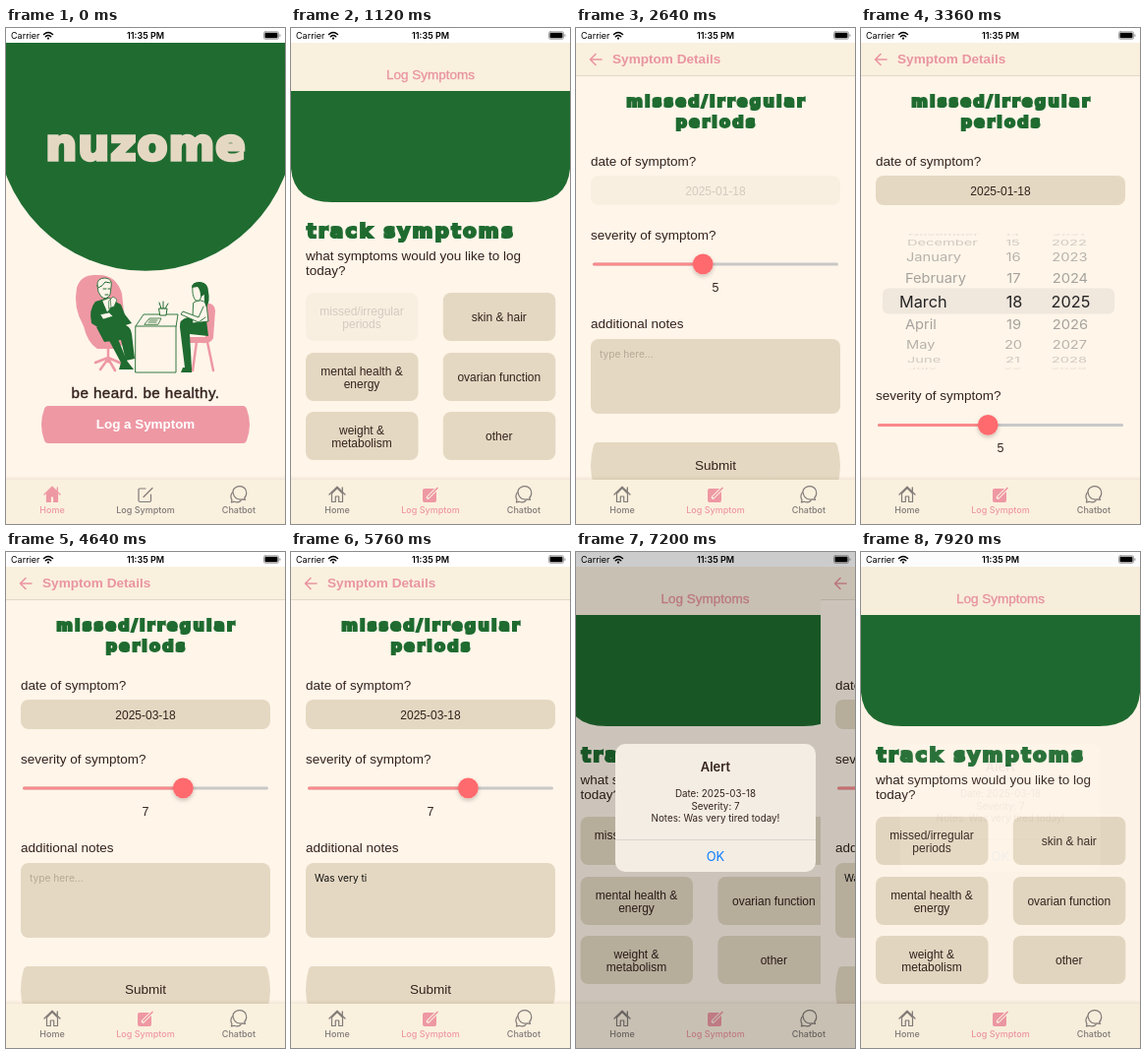
These frames come from a looping animation (284x504 px, 8000 ms). An HTML page:

```html
<!DOCTYPE html>
<html lang="en">
<head>
<meta charset="utf-8">
<title>Symptom tracker</title>
<style>
  html, body { margin: 0; width: 100%; height: 100%; overflow: hidden; background: #fff5e9; }
  svg { display: block; width: 100vw; height: 100vh; }
  text { font-family: "Liberation Sans", Arial, sans-serif; fill: #33221d; white-space: pre; }
  .mid { text-anchor: middle; }
  .ui { font-family: Inter, sans-serif; }
  .fat { font-family: "DejaVu Sans", sans-serif; font-weight: 700; fill: #1f6b30; stroke: #1f6b30; stroke-width: 2.2; }
  .bold { font-weight: 700; }
  .semi { font-weight: 600; }
  .tab { font-weight: 500; fill: inherit; }
  .pink { fill: #e995a1; }
</style>
</head>
<body>
<svg id="stage" viewBox="0 0 284 504"></svg>
<script>
const LOOP = 8000;
const PAGE = '#fff5e9', BAR = '#faf0de', GREEN = '#1f6b30', BEIGE = '#e5d8c2', PINK = '#ee98a4';
const MONTHS = ['January', 'February', 'March', 'April', 'May', 'June', 'July',
  'August', 'September', 'October', 'November', 'December'];
const NOTE = 'Was very tired today!';

// y is the vertical middle of the text
const text = (x, y, size, str, cls = '', more = '') =>
  `<text x="${x}" y="${y + size * .35}" font-size="${size}" class="${cls}" ${more}>${str}</text>`;
const box = (x, y, w, h, fill, rx = 0, ry = rx) =>
  `<rect x="${x}" y="${y}" width="${w}" height="${h}" rx="${rx}" ry="${ry}" fill="${fill}"/>`;
const path = (d, fill = 'none', stroke = 'none', width = 1) =>
  `<path d="${d}" fill="${fill}" stroke="${stroke}" stroke-width="${width}" stroke-linecap="round" stroke-linejoin="round"/>`;
const fat = (x, y, size, spacing, str, cls = '') =>
  `<text x="${x}" y="${y}" font-size="${size}" letter-spacing="${spacing}" class="fat ${cls}">${str}</text>`;
const group = (id, content) => `<g id="${id}">${content}</g>`;

function choice(x, y, lines) {
  const top = y + 25 - (lines.length - 1) * 6.5;
  return box(x, y, 114.5, 49, BEIGE, 8) +
    lines.map((line, i) => text(x + 57, top + i * 13, 12, line, 'mid')).join('');
}

// button with sides that bulge outwards
const pill = (x, y, w, h, fill) =>
  path(`M${x + 7} ${y}H${x + w - 7}Q${x + w - 4} ${y} ${x + w - 3} ${y + 3}Q${x + w + 3} ${y + h / 2} ${x + w - 3} ${y + h - 3}` +
    `Q${x + w - 4} ${y + h} ${x + w - 7} ${y + h}H${x + 7}Q${x + 4} ${y + h} ${x + 3} ${y + h - 3}Q${x - 3} ${y + h / 2} ${x + 3} ${y + 3}Q${x + 4} ${y} ${x + 7} ${y}Z`, fill);

const meeting =
  // armchair
  path('M72 264Q76 250 93 251Q112 250 118 270L122 308Q122 325 110 326L93 326Q83 320 79 303Q68 284 72 264Z', PINK) +
  path('M104 326V339M91 340L104 335L118 341M96 347L104 336L111 348', 'none', PINK, 2.5) +
  // man
  path('M92 304L118 301Q127 302 128 311L131 336L122 338L117 317L100 319Z', GREEN) +
  path('M102 312L112 311L123 338L130 347H115L117 340Z', GREEN) +
  path('M91 278L104 274L117 281L121 291L128 300L112 305L95 305L87 300Q84 286 91 278Z', GREEN) +
  path('M98 277L106 274L107 284L103 289ZM105 277l4 -4 4 3 -3 7 -5 2zM96 291l9 -2 4 4 -10 3z', PAGE, GREEN, .7) +
  path('M93 262Q92 254 101 254Q109 255 107 263L106 271Q102 277 97 273Q93 269 93 262Z', PAGE, GREEN, .9) +
  path('M94 264Q99 262 101 258L106 259M99 265h3M104 265h2M101 271h3', 'none', GREEN, 1) +
  // table
  path('M132 303L140 291H175L173 304V350H132ZM132 303H173', PAGE, GREEN, .9) +
  path('M141 301L146 295H158L155 301ZM146 297h8M145 299h8', PAGE, GREEN, .8) +
  path('M156 285H164L163 292H157ZM158 285L156 279M160 285V278M162 285L165 280', PAGE, GREEN, 1) +
  // chair and woman
  path('M202 280Q212 278 213 287L211 315Q209 321 199 320H187V314H203Z', PINK) +
  path('M194 319L190 348M205 319L211 348', 'none', PINK, 2.5) +
  path('M204 297L185 294Q176 296 177 304L182 345L189 346L187 311L206 313Z', GREEN) +
  path('M180 345H189V350H178Z', GREEN) +
  path('M191 279Q198 274 204 280L206 298L190 300Z', PAGE, GREEN, .9) +
  path('M201 283L196 294L180 288L178 291L196 299L203 294', PAGE, GREEN, .9) +
  path('M190 262Q190 259 196 259L200 270L197 277H193Q189 272 190 262Z', PAGE, GREEN, .9) +
  path('M189 264Q190 257 198 258Q206 259 206 268Q208 277 204 284Q201 278 202 271L198 273Q198 266 195 263Z', GREEN);

const home = box(0, 0, 284, 504, PAGE) + box(0, 15, 284, 80, GREEN) +
  `<circle cx="142" cy="94.8" r="152" fill="${GREEN}"/>` +
  `<text x="142.5" y="134" font-size="45" letter-spacing="1" class="fat mid" style="fill:${BEIGE};stroke:${BEIGE};stroke-width:3.4">nuzome</text>` +
  meeting +
  text(142, 370.5, 15.2, 'be heard. be healthy.', 'mid', 'letter-spacing=".45" stroke="#33221d" stroke-width=".4"') +
  group('logButton', pill(36, 384, 212, 38, PINK) +
    text(142, 402.5, 13.4, 'Log a Symptom', 'mid bold', 'style="fill:#fff"'));

const log = box(0, 0, 284, 504, PAGE) + box(0, 15, 284, 49, BAR) +
  text(142, 47, 13.5, 'Log Symptoms', 'mid pink', 'stroke="#e995a1" stroke-width=".35"') +
  path('M0 64H284V143Q281 177 242 177H42Q3 177 0 143Z', GREEN) +
  fat(16, 213, 20, 2.2, 'track symptoms') +
  text(15, 231.2, 13.5, 'what symptoms would you like to log') + text(15, 246.2, 13.5, 'today?') +
  group('missed', choice(15, 269, ['missed/irregular', 'periods'])) +
  choice(154.8, 269, ['skin &amp; hair']) +
  choice(15, 330, ['mental health &amp;', 'energy']) +
  choice(154.8, 330, ['ovarian function']) +
  choice(15, 390, ['weight &amp;', 'metabolism']) +
  choice(154.8, 390, ['other']);

const details = box(0, 0, 284, 504, PAGE) + box(0, 15, 284, 33, BAR) + box(0, 48, 284, 1, '#e2d8ca') +
  path('M26 32H15M20 26.5L14.5 32L20 37.5', 'none', '#e995a1', 1.6) +
  text(37, 31.5, 13.6, 'Symptom Details', 'bold pink') +
  fat(143, 80, 16, 2.2, 'missed/irregular', 'mid') + fat(143, 100.5, 16, 2.2, 'periods', 'mid') +
  text(15, 135, 13.5, 'date of symptom?') +
  group('dateButton', box(15, 150, 254, 30, BEIGE, 8) + text(142, 165.3, 12, '', 'mid', 'id="date"')) +
  group('wheel', '') +
  group('form',
    text(15, 210.2, 13.5, 'severity of symptom?') +
    box(17, 238.5, 250, 3, '#c9c8c7', 1.5) +
    `<rect id="fill" x="17" y="238.5" height="3" rx="1.5" fill="#f98a8b"/>` +
    '<circle id="knob" cy="239.8" r="10.4" fill="#ff6b6e" filter="url(#soft)"/>' +
    text(142, 263.5, 12.5, '', 'mid', 'id="severity"') +
    text(15, 300.2, 13.5, 'additional notes') +
    box(15, 316, 254, 76, BEIGE, 8) +
    text(24, 331, 10.2, '', 'ui', 'id="note"') +
    pill(15, 421, 254, 47, BEIGE) + text(142, 444.5, 13.5, 'Submit', 'mid', 'id="submit"'));

const status = box(0, 0, 284, 15, '#fff') +
  text(5, 8, 9, 'Carrier', 'ui', 'style="fill:#000"') +
  text(142, 8, 9, '11:35 PM', 'ui mid semi', 'style="fill:#000"') +
  path('M38.5 6.5Q43 2.5 47.5 6.5M40.3 8.7Q43 6.3 45.7 8.7', 'none', '#000', 1.5) +
  '<circle cx="43" cy="10.6" r="1.1"/>' +
  path('M264 3.8H276Q277.5 3.8 277.5 5.3V9.7Q277.5 11.2 276 11.2H264Q262.5 11.2 262.5 9.7V5.3Q262.5 3.8 264 3.8Z', '#fff', '#888', .8) +
  box(263.5, 4.8, 13, 5.4, '#000', 1) + box(278.4, 6.2, 1, 2.6, '#888', .5);

const alertBox = '<rect width="284" height="504" opacity=".2"/>' +
  group('alertCard', box(40, 195, 204, 130, '#f4ede4', 10) +
    text(142, 218, 12.9, 'Alert', 'ui mid semi') +
    ['Date: 2025-03-18', 'Severity: 7', 'Notes: ' + NOTE]
      .map((line, i) => text(142, 246 + i * 12.3, 9.8, line, 'ui mid')).join('') +
    box(40, 292, 204, .6, '#c9c5c0') +
    text(142, 309, 12.9, 'OK', 'ui mid', 'style="fill:#0a7aff"'));

function tabs(active) {
  const ink = i => i === active ? PINK : '#817b78';
  const solid = i => i === active ? PINK : 'none';
  const pencil = active === 1
    ? path('M136 468H146Q148 468 148 470V480Q148 482 146 482H136Q134 482 134 480V470Q134 468 136 468Z', PINK) +
      path('M139.5 477L148 468.5', 'none', BAR, 3.6) + path('M140 476.5L149 467.5', 'none', PINK, 1.7)
    : path('M142 468H136Q135 468 135 469V480Q135 481.5 136.5 481.5H146Q147.5 481.5 147.5 480V474M140 476.5L149 467.5', 'none', ink(1), 1.2);
  return box(0, 459, 284, 45, BAR) +
    path('M41.5 473V481.5H45.3V476H48.7V481.5H52.5V473L47 467.5Z', solid(0), ink(0), 1.2) +
    path('M39 474L47 466.3L55 474M52.3 467V471', 'none', ink(0), 1.3) + pencil +
    path('M232.5 476Q229 470 233.5 467Q239 464 243.3 468Q246.5 473 242.7 477.5L243.5 479.5L240.5 478.8Q235.5 480 232.5 476Z', 'none', ink(2), 1.2) +
    path('M230.3 472Q227.7 476 230 479.5L229.4 482L232.3 481.3Q236 482.8 239 480.5', 'none', ink(2), 1.2) +
    ['Home', 'Log Symptom', 'Chatbot'].map((name, i) =>
      text(47 + 95 * i, 490, 9, name, 'ui mid tab', `style="fill:${ink(i)}"`)).join('');
}

document.getElementById('stage').innerHTML =
  `<defs><filter id="soft" x="-50%" y="-50%" width="200%" height="200%">
    <feDropShadow dx="0" dy="2" stdDeviation="2" flood-opacity=".22"/></filter>
  <linearGradient id="shade" x2="0" y2="1"><stop stop-color="#785a32" stop-opacity="0"/>
    <stop offset="1" stop-color="#785a32" stop-opacity=".1"/></linearGradient></defs>` +
  group('home', home) + group('log', log) + group('details', details) +
  box(0, 455, 284, 4, 'url(#shade)') +
  group('homeTabs', tabs(0)) + group('logTabs', tabs(1)) + status + group('alert', alertBox);

const el = id => document.getElementById(id);
const show = (id, on) => el(id).setAttribute('display', on ? 'inline' : 'none');
const fade = (id, value) => el(id).setAttribute('opacity', value);
const move = (id, x, y = 0) => el(id).setAttribute('transform', `translate(${x} ${y})`);
const ramp = (t, from, to) => Math.min(1, Math.max(0, (t - from) / (to - from)));
const easeOut = p => 1 - (1 - p) ** 3;
const smooth = p => p * p * (3 - 2 * p);

function wheelRow(k, x, str, anchor) {
  const far = Math.min(1, Math.abs(k)), angle = k * Math.PI / 9;
  const scale = 1 - .1 * far, squash = scale * Math.cos(angle);
  if (squash <= .1) return '';
  const shade = Math.round(35 + 130 * far), alpha = Math.min(1, 1.35 - .27 * Math.abs(k));
  return `<text class="ui" font-size="16.3" y="5.8" text-anchor="${anchor}" style="fill:rgb(${shade},${shade - 3 * far},${shade - 8 * far})"
    opacity="${alpha}" transform="translate(${x} ${277.7 + 69 * Math.sin(angle)}) scale(${scale} ${squash})">${str}</text>`;
}

function wheel(month) {
  let rows = box(22, 264.5, 236, 26, '#f0e7dd', 6);
  for (let i = -4; i <= 4; i++) {
    const m = Math.round(month) + i, k = m - month;
    rows += wheelRow(k, 39 + 5 * Math.min(1, Math.abs(k)) + Math.abs(k), MONTHS[(m + 12) % 12], 'start') +
      wheelRow(i, 156 - .5 * Math.abs(i), 18 + i, 'middle') +
      wheelRow(i, 213.4 - .5 * Math.abs(i), 2025 + i, 'middle');
  }
  return rows;
}

function draw(t) {
  const atHome = t < 560;
  show('home', atHome);
  show('homeTabs', atHome);
  show('logTabs', !atHome);
  fade('logButton', 1 - .8 * ramp(t, 400, 480));

  const pushed = easeOut(ramp(t, 1200, 1640)) - easeOut(ramp(t, 7000, 7400));
  show('log', !atHome && pushed < 1);
  show('details', pushed > 0);
  move('log', -85 * pushed);
  move('details', 284 * (1 - pushed));
  fade('missed', t < 4000 ? 1 - .8 * ramp(t, 1000, 1100) : 1);

  const picking = t >= 2720 && t < 3520;
  fade('dateButton', 1 - .8 * (ramp(t, 2560, 2640) - ramp(t, 2720, 2880)));
  el('wheel').innerHTML = picking ? wheel(2 * smooth(ramp(t, 2920, 3340))) : '';
  move('form', 0, picking ? 163.5 : 0);
  el('date').textContent = t < 3520 ? '2025-01-18' : '2025-03-18';

  const level = 5 + 2 * smooth(ramp(t, 3840, 4560));
  const knobX = 27 + 230 * (level - 1) / 9;
  el('knob').setAttribute('cx', knobX);
  el('fill').setAttribute('width', knobX - 17);
  el('severity').textContent = Math.round(level);

  const typed = Math.floor(NOTE.length * ramp(t, 5000, 6400));
  el('note').textContent = typed ? NOTE.slice(0, typed) : 'type here...';
  el('note').style.fill = typed ? '#111' : '#b5a996';
  fade('submit', 1 - .8 * ramp(t, 6720, 6840));

  const opened = easeOut(ramp(t, 6960, 7160));
  fade('alert', opened * (1 - ramp(t, 7680, 7935)));
  const zoom = 1.15 - .15 * opened;
  el('alertCard').setAttribute('transform', `translate(142 260) scale(${zoom}) translate(-142 -260)`);
}

const start = performance.now();
function tick() {
  draw((performance.now() - start) % LOOP);
  requestAnimationFrame(tick);
}
tick();
</script>
</body>
</html>
```
